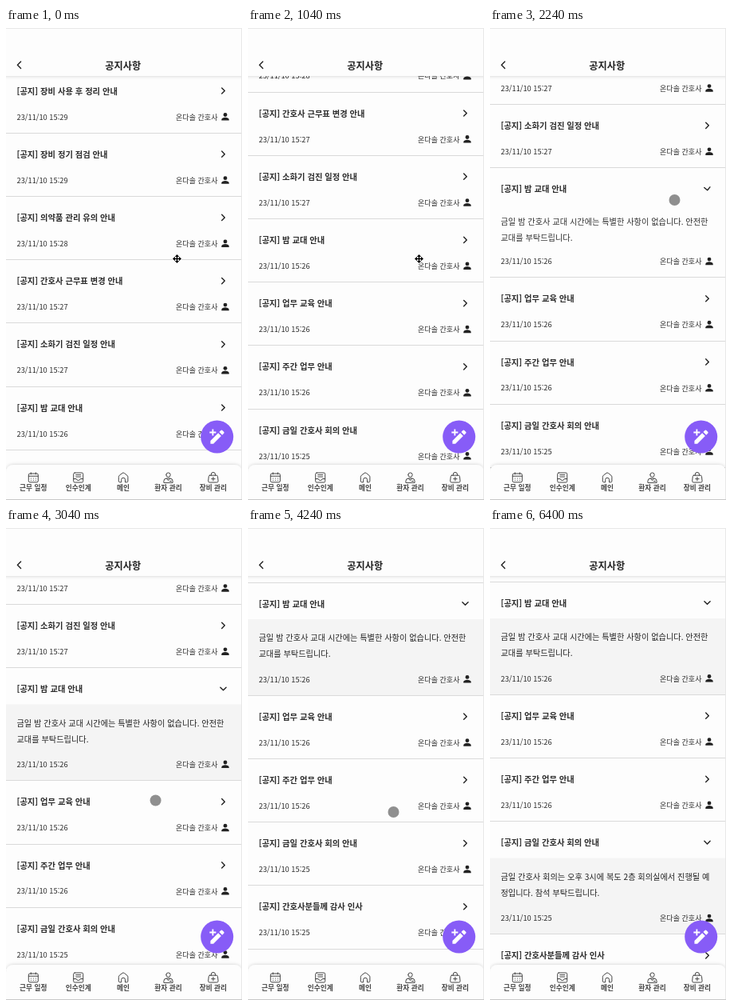
Animation of 296 by 590 pixels, one loop 6.56 s. Source, as an HTML page:

```html
<!DOCTYPE html>
<html lang="ko">
<head>
<meta charset="utf-8">
<title>공지사항</title>
<style>
  html, body { margin: 0; width: 100%; height: 100%; overflow: hidden; background: #fdfdfd; }
  svg { display: block; width: 100%; height: 100%; }
  text { font-family: "Noto Sans CJK KR", "Noto Sans CJK", "Noto Sans", sans-serif; fill: #222; }
  .heading { font-size: 12.2px; font-weight: 700; }
  .subject { font-size: 10.3px; font-weight: 700; fill: #2c2c2c; }
  .body { font-size: 10.2px; fill: #222; }
  .date { font-size: 9.3px; fill: #2c2c2c; }
  .author { font-size: 9.05px; fill: #2c2c2c; }
  .tab { font-size: 8.7px; font-weight: 700; fill: #444; }
  .middle { text-anchor: middle; }
  .end { text-anchor: end; }
  .line { fill: none; stroke: #222; stroke-width: 1.4; stroke-linecap: round; stroke-linejoin: round; }
  .icon { fill: none; stroke: #444; stroke-width: 1; stroke-linecap: round; stroke-linejoin: round; }
</style>
</head>
<body>
<svg viewBox="0 0 296 590" preserveAspectRatio="none">
  <defs>
    <filter id="shadow" x="-20%" y="-40%" width="140%" height="180%">
      <feDropShadow dx="0" dy="0" stdDeviation="2" flood-color="#000" flood-opacity=".2"/>
    </filter>
    <g id="person" fill="#222">
      <circle cy="-2.5" r="2.4"/>
      <path d="M-4.7 4.6V3.4C-4.7 1.6-2 .7 0 .7S4.7 1.6 4.7 3.4V4.6Z"/>
    </g>
  </defs>
  <rect width="296" height="590" fill="#fdfdfd"/>
  <g id="list"></g>

  <rect x="-10" y="-10" width="316" height="70" fill="#fdfdfd" filter="url(#shadow)"/>
  <path class="line" d="M18.6 42l-4.2 4.2 4.2 4.2"/>
  <text class="heading middle" x="146.7" y="51.5">공지사항</text>

  <g transform="translate(264.7 511)">
    <circle r="20.5" fill="#875cf7"/>
    <g fill="#fff" transform="scale(1.06)">
      <path d="M-7.8 8.2V4.7L1.4-4.5 4.9-1 -4.3 8.2ZM2.6-5.7L4.5-7.6Q5.4-8.4 6.3-7.6L8-5.9Q8.8-5 8-4.1L6.1-2.2Z"/>
      <path d="M-5-9v7.6M-8.8-5.2h7.6" stroke="#fff" stroke-width="1.7"/>
    </g>
  </g>

  <rect x="0" y="546" width="296" height="60" rx="9" fill="#fdfdfd" filter="url(#shadow)"/>
  <g id="tabs"></g>
  <path d="M0 .5H296M295.5 0V590" stroke="#e8e8e8" fill="none"/>
  <path d="M0 589.5H296" stroke="#c8c8c8"/>

  <g id="autoscroll" transform="translate(214.5 288.5)">
    <path d="M0-5.7L5.7 0 0 5.7-5.7 0Z" fill="#fff" stroke="#fff" stroke-width="1.5"/>
    <path d="M0-5.5L2.7-2.6H-2.7ZM0 5.5L2.7 2.6H-2.7ZM-5.5 0L-2.6-2.7V2.7ZM5.5 0L2.6-2.7V2.7Z"/>
    <path d="M0-4V4M-4 0H4" stroke="#000" stroke-width="1.5"/>
  </g>
  <circle id="pointer" r="7" fill="#8f8f8f"/>
</svg>
<script>
const LOOP = 6560, STEP = 80;
const FIRST_ROW = 78.5, ROW_HEIGHT = 79.2, DIVIDER = 52.8, GROWTH = 62;
const AUTHOR = '온다솔 간호사';

const notices = [
  ['장비 사용 후 정리 안내', '15:29'],
  ['장비 정기 점검 안내', '15:29'],
  ['의약품 관리 유의 안내', '15:28'],
  ['간호사 근무표 변경 안내', '15:27'],
  ['소화기 검진 일정 안내', '15:27'],
  ['밤 교대 안내', '15:26', 2000,
    ['금일 밤 간호사 교대 시간에는 특별한 사항이 없습니다. 안전한', '교대를 부탁드립니다.']],
  ['업무 교육 안내', '15:26'],
  ['주간 업무 안내', '15:26'],
  ['금일 간호사 회의 안내', '15:25', 5120,
    ['금일 간호사 회의는 오후 3시에 복도 2층 회의실에서 진행될 예', '정입니다. 참석 부탁드립니다.']],
  ['간호사분들께 감사 인사', '15:25']
];

const tabs = [
  ['근무 일정', 'M-6-3.5Q-6-5-4.5-5h9Q6-5 6-3.5v7.5Q6 5.8 4.5 5.8h-9Q-6 5.8-6 4ZM-6-1.8H6M-3-6.2v2M3-6.2v2M-3 1h.1M0 1h.1M3 1h.1M-3 3.4h.1M0 3.4h.1M3 3.4h.1'],
  ['인수인계', 'M-4.5-6h9Q6-6 6-4.5v9Q6 6 4.5 6h-9Q-6 6-6 4.5v-9Q-6-6-4.5-6ZM-6 1.5h3.4Q-2 3.5 0 3.5T2.6 1.5H6M-3-3.4h6M-3-1h6'],
  ['메인', 'M-5.8-.8Q-5.8-2-4.8-2.8L-1.2-5.6Q0-6.5 1.2-5.6L4.8-2.8Q5.8-2 5.8-.8V4.3Q5.8 5.8 4.3 5.8H2.4V2.6A2.4 2.4 0 0 0-2.4 2.6V5.8H-4.3Q-5.8 5.8-5.8 4.3Z'],
  ['환자 관리', 'M-2.7-3.4a2.7 2.7 0 1 0 5.4 0a2.7 2.7 0 1 0-5.4 0M-5.6 6V4.4Q-5.6 1-2 1H2Q5.6 1 5.6 4.4V6ZM-2 1L0 3.6 2 1M2 4.5h1.8'],
  ['장비 관리', 'M-4.3-2.8h8.6Q5.4-2.8 5.6-1.5L6.2 4.2Q6.3 6 4.6 6h-9.2Q-6.3 6-6.2 4.2L-5.6-1.5Q-5.4-2.8-4.3-2.8ZM-2.6-2.8V-4A2.6 2.6 0 0 1 2.6-4V-2.8M0-.6v4.4M-2.2 1.6h4.4']
];

const byId = id => document.getElementById(id);
const place = (node, x, y, extra = '') => node.setAttribute('transform', `translate(${x} ${y})${extra}`);

function add(parent, tag, attributes = {}, content = '') {
  const node = document.createElementNS('http://www.w3.org/2000/svg', tag);
  for (const name in attributes) node.setAttribute(name, attributes[name]);
  node.textContent = content;
  return parent.appendChild(node);
}

const label = (parent, style, x, y, content) =>
  add(parent, 'text', { class: style, x, y, dy: '.38em' }, content);

const rows = notices.map(([subject, time, opensAt, lines]) => {
  const group = add(byId('list'), 'g');
  const panel = add(group, 'rect', { y: 19.5, width: 296, fill: '#f4f4f4' });
  label(group, 'subject', 13.5, 0.2, '[공지] ' + subject);
  const chevron = add(group, 'path', { class: 'line', d: 'M-1.8-3.6L1.8 0-1.8 3.6' });
  const body = add(group, 'g');
  (lines || []).forEach((line, i) => label(body, 'body', 13.5, i * 20, line));
  const footer = add(group, 'g');
  label(footer, 'date', 13.5, 0, '23/11/10 ' + time);
  label(footer, 'author end', 265.5, 0.2, AUTHOR);
  add(footer, 'use', { href: '#person', x: 275, y: 0 });
  add(footer, 'rect', { y: DIVIDER - 33, width: 296, height: 1, fill: '#dadada', 'shape-rendering': 'crispEdges' });
  return { group, panel, chevron, body, footer, opensAt };
});

tabs.forEach(([name, shape], i) => {
  const x = 34.3 + i * 56.4;
  add(byId('tabs'), 'path', { class: 'icon', d: shape, transform: `translate(${x} 562)` });
  label(byId('tabs'), 'tab middle', x, 575, name);
});

const ramp = (t, from, to) => Math.min(1, Math.max(0, (t - from) / (to - from)));
const smooth = x => x * x * (3 - 2 * x);
const easeOut = (x, power) => 1 - (1 - x) ** power;

const scrollAt = t =>
  125 * ramp(t, 250, 640) +
  80 * easeOut(ramp(t, 640, 980), 1.6) +
  68.5 * smooth(ramp(t, 980, 1360)) +
  107.5 * smooth(ramp(t, 3900, 4260));

// Each move: start, end, destination x and y.
const moves = [
  [1520, 1840, 231.5, 215],
  [2720, 3120, 182.5, 355],
  [4480, 4880, 222, 419],
  [5680, 5760, 146, 364]
];

function pointerAt(t) {
  let x = 214.5, y = 288.5;
  for (const [from, to, toX, toY] of moves) {
    const p = smooth(ramp(t, from, to));
    x += (toX - x) * p;
    y += (toY - y) * p;
  }
  return [x, y];
}

function draw(t) {
  let y = FIRST_ROW - scrollAt(t);
  for (const { group, panel, chevron, body, footer, opensAt = Infinity } of rows) {
    const open = t < opensAt ? 0 : easeOut(ramp(t, opensAt, opensAt + 400), 3);
    place(group, 0, y);
    place(chevron, 272.5, 0, ` rotate(${90 * open})`);
    place(body, 0, 20 + 23 * open);
    place(footer, 0, 32.5 + GROWTH * open);
    body.setAttribute('opacity', open);
    panel.setAttribute('height', DIVIDER - 19.5 + GROWTH * open);
    panel.setAttribute('opacity', t < opensAt ? 0 : ramp(t, opensAt + 240, opensAt + 400));
    y += ROW_HEIGHT + GROWTH * open;
  }
  place(byId('pointer'), ...pointerAt(t));
  byId('autoscroll').style.display = t < 1600 ? '' : 'none';
  byId('pointer').style.display = t >= 1600 && t < 5840 ? '' : 'none';
}

const start = performance.now();
function frame() {
  const t = (performance.now() - start) % LOOP;
  draw(Math.floor(t / STEP) * STEP);
  requestAnimationFrame(frame);
}
frame();
</script>
</body>
</html>
```
